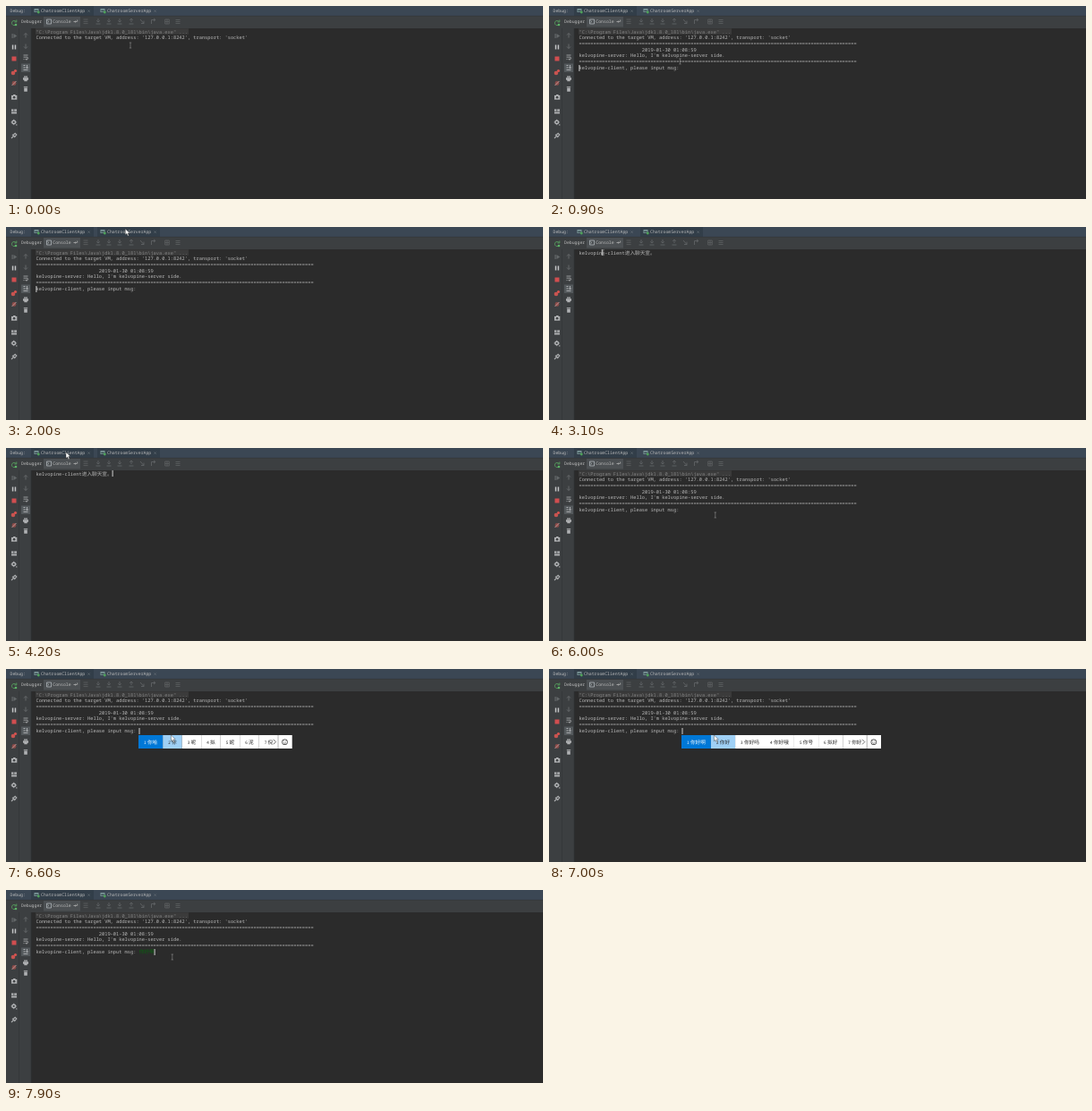
Recreate the animation shown at these times as an HTML page. Size 600 by 216 pixels, loop 8 s.

```html
<!DOCTYPE html>
<html lang="zh-CN">
<head>
<meta charset="utf-8">
<title>Chatroom console</title>
<style>
html, body { margin: 0; width: 100%; height: 100%; overflow: hidden; background: #2b2b2b; }
svg { display: block; width: 600px; height: 216px; }
text { white-space: pre; text-rendering: geometricPrecision; font-family: "Noto Sans Mono", "DejaVu Sans Mono", "Noto Sans CJK SC", "Noto Sans CJK", monospace; }
.ui { font-size: 4.83px; fill: #bcbcbc; }
.out { font-size: 5.34px; fill: #bbbbbb; }
.cjk { font-size: 5.65px; font-family: "Noto Sans CJK SC", "Noto Sans CJK", "Noto Sans", sans-serif; }
.digit { font-size: 4.6px; }
.line { fill: none; stroke-width: 1; }
</style>
</head>
<body>
<svg id="stage" viewBox="0 0 600 216" xmlns="http://www.w3.org/2000/svg">
  <rect width="600" height="216" fill="#2b2b2b"/>
  <rect width="600" height="25" fill="#3c3f41"/>
  <rect width="28" height="216" fill="#3c3f41"/>
  <rect width="600" height="11" fill="#3b4754"/>
  <rect id="selected" width="70" height="11" fill="#323e49"/>
  <rect id="hovered" width="70" height="11" fill="#323e49"/>
  <path d="M14.5 25V216M28 25V216M0 11.2H600" class="line" stroke="#323537" style="stroke-width:.6"/>
  <text class="ui" x="4.5" y="7.2">Debug:</text>
  <g id="tabs"></g>
  <rect x="42" y="12" width="41" height="11.5" fill="#4c5053"/>
  <text class="ui" x="17" y="19.3">Debugger</text>
  <text class="ui" x="52.3" y="19.3">Console</text>
  <path d="M45.5 15h5v5h-5zM46.5 16.3l1.3 1.2-1.3 1.2" class="line" stroke="#aeb4b8" style="stroke-width:.8"/>
  <path d="M75.5 17.5h3m-1-1l1 1-1 1M79.7 15.5v2.2" class="line" stroke="#b4b4b4" style="stroke-width:.8"/>
  <g id="toolbar"></g>
  <g id="rail"></g>
  <g id="client">
    <rect x="33" y="25.3" width="171" height="6.4" fill="#3b3b3b"/>
    <g id="intro"></g>
    <g id="greeting"></g>
    <text id="input" class="cjk" x="148.7" y="70.8" fill="#08650e">你好啊</text>
  </g>
  <g id="server"></g>
  <rect id="caret" width="1" height="7" fill="#d0d0d0"/>
  <g id="popup"></g>
  <path id="ibeam" d="M-1.2-3H1.2M0-3V3M-1.2 3H1.2" class="line" stroke="#8e8e8e" style="stroke-width:.6"/>
  <path id="arrow" d="M0 0V6.8L1.6 5.3 2.8 8 4 7.5 2.8 4.9H5z" fill="#fff" stroke="#222" stroke-width=".4"/>
</svg>
<script>
const LOOP = 8000, STEP = 100;
const $ = id => document.getElementById(id);
const show = (id, on) => $(id).setAttribute('visibility', on ? 'inherit' : 'hidden');
const place = (id, x, y) => $(id).setAttribute('transform', `translate(${x} ${y})`);
const label = (cls, x, y, s, fill) =>
  `<text class="${cls}" x="${x}" y="${y}"${fill ? ` style="fill:${fill}"` : ''}>${s}</text>`;
const stroke = (d, color, width = 1) =>
  `<path d="${d}" class="line" stroke="${color}" style="stroke-width:${width}"/>`;
const shape = (d, color) => `<path d="${d}" fill="${color}"/>`;
const dot = (x, y, r, color) => `<circle cx="${x}" cy="${y}" r="${r}" fill="${color}"/>`;

// Static interface
const TABS = { client: 28, server: 102 };
const tab = (x, name) =>
  shape(`M${x} 3h5v4h-5z`, '#7f9a9c') + shape(`M${x + .8} 4.5h3.4v1.8h-3.4z`, '#3d5356') +
  dot(x + 4.8, 7, 1.4, '#4fa35a') + label('ui', x + 7.5, 7.2, name) +
  stroke(`M${x + 60} 4.5l2.2 2.2m0-2.2l-2.2 2.2`, '#717980', .6);
$('tabs').innerHTML =
  tab(TABS.client + 3.5, 'ChatroomClientApp') + tab(TABS.server + 3.5, 'ChatroomServerApp');

const stepIcon = (x, head) => `M${x - 2.5} 20h5M${x} 14v4${head}`;
$('toolbar').innerHTML =
  stroke('M86.5 15h5M86.5 17.3h5M86.5 19.6h5', '#5d6163', .8) +
  stroke([103, 115, 127].map(x => stepIcon(x, 'm-1.8-1.6l1.8 1.6 1.8-1.6')).join('') +
    stepIcon(140, 'm-1.8-2.2l1.8-1.8 1.8 1.8') +
    'M150 15l4 4.5m0-3v3h-3M162.5 20V15.5h4.5m-2-1.5l2 1.5-2 1.5', '#5f6365', .9) +
  stroke('M177.7 15h4.6v5h-4.6zM177.7 17.5h4.6M180 15v5M189.5 15.5h5M189.5 17.5h5M189.5 19.5h5', '#5d6163', .8);

const GREY = '#afb1b3', DIM = '#64686a', RED = '#c75450';
$('rail').innerHTML =
  stroke('M11.2 17.5A2.6 2.6 0 1 0 11.5 20M11.8 15.5v2.4H9.4', '#559b5d') + dot(11, 21, 1.3, '#5db567') +
  shape('M6.5 31h1.2v5H6.5zM8.5 31l3.7 2.5-3.7 2.5z', DIM) +
  shape('M6.8 43.5h1.5v5H6.8zM9.7 43.5h1.5v5H9.7z', '#c2c4c5') +
  shape('M6.5 56.5h5v5h-5z', '#d14e50') +
  dot(8, 75, 2.3, RED) + dot(10.5, 72.5, 1.6, '#d9534f') +
  dot(9, 86.5, 2.4, '#8b4b49') + stroke('M6.5 89l5-5', '#c2a09e', .9) +
  shape('M6 100h1.7l.7-1h1.8l.7 1H12.3v4.8H6z', GREY) + dot(9.1, 102.3, 1.3, '#3c3f41') +
  shape('M6 115.5h2.5v2.2H6zM9.2 115.5h2.8v2.2H9.2zM6 118.5h6v2H6z', GREY) +
  stroke('M8.7 126.8v6.4M5.5 130h6.4', GREY, .8) + dot(8.7, 130, 2.5, GREY) +
  dot(8.7, 130, 1.1, '#3c3f41') + dot(11.8, 133, .7, GREY) +
  stroke('M6 148l2.4-2.4M7 143.8l3.2 3.2M8 144.5l2.2-2 1.6 1.6-2 2.2', GREY, 1.1) +
  stroke('M22 35.5v-5m-2 2l2-2 2 2M22 42.5v5m-2-2l2 2 2-2', DIM) +
  stroke('M19.5 55h5M19.5 57.2h4.5q1.2 1.2 0 2.4h-2m1-1l-1 1 1 1M19.5 59.6h1', GREY, .8) +
  shape('M17 64.5h10v9.5H17z', '#54595c') +
  stroke('M19.5 71.5h5M19.5 66.5h2M19.5 69h2M23.5 66v4m-1.4-1.4l1.4 1.4 1.4-1.4', '#c0c2c4', .8) +
  shape('M20 78.5h4v1.3h-4zM19 80.3h6v2.5h-6zM20.3 82.8h3.4v1.4h-3.4z', GREY) +
  shape('M19.8 90.3h4.4v.9h-4.4zM20.2 91.8h3.6v4h-3.6z', GREY);

// Console contents
const CLIENT = 'kelvopine-client', SERVER = 'kelvopine-server';
const RULE = '='.repeat(97);
const row = n => 30.5 + n * 6.72;
const lines = (list, first) => list.map((s, i) => label('out', 33.5, row(first + i), s)).join('');
$('intro').innerHTML =
  label('out', 33.5, row(0), '"C:\\Program Files\\Java\\jdk1.8.0_181\\bin\\java.exe" ...', '#858585') +
  lines(["Connected to the target VM, address: '127.0.0.1:8242', transport: 'socket'"], 1);
$('greeting').innerHTML = lines([
  RULE, ' '.repeat(22) + '2019-01-30 01:08:59', `${SERVER}: Hello, I'm ${SERVER} side.`,
  RULE, `${CLIENT}, please input msg: `
], 2);
$('server').innerHTML = label('out', 33.5, row(0), CLIENT) + label('cjk', 84.8, row(0), '进入聊天室。', '#bbbbbb');

// Each step holds until the next one: [ms, value]
const caretSteps = [
  [0, null], [700, [33.4, 66]], [2300, null], [2900, [58.8, 25]], [3500, [118.6, 25]],
  [4500, [33.4, 66]], [5000, [148.5, 66]], [6000, null], [6200, [148.5, 66]], [7100, [165.6, 66]]
];
const popupSteps = [
  [0, ''], [6300, '你 那 能 年 呢 内 拿'], [6400, '你 呢 拟 妮 泥 倪 尼'],
  [6500, '你好 你 呢 拟 妮 泥 倪'], [6600, '你哈 你 呢 拟 妮 泥 倪'],
  [6700, '你好 你号 拟好 你 呢 拟 妮'], [6800, '你好啊 你好阿 你好 你好奥 你好哦 你好吖 你号'],
  [7000, '你好啊 你好 你好吗 你好哦 你号 拟好 你好'], [7100, '']
];
const mousePath = [
  [0, 139, 44], [200, 139, 51], [400, 139, 51], [1200, 150, 67], [1400, 164, 80], [1900, 134, 4],
  [2000, 133.3, 2], [2300, 133.3, 2], [2900, 61, 29], [3200, 60.5, 28.5], [3500, 121, 31],
  [3600, 121, 33], [4000, 68.5, 9], [4200, 67, 4.7], [4500, 67, 4.7], [5000, 186, 77], [5200, 185.8, 75]
];

const held = (steps, t) => steps.filter(s => s[0] <= t).pop()[1];
function mouseAt(t) {
  const i = mousePath.findIndex(p => p[0] > t);
  if (i < 0) return mousePath[mousePath.length - 1].slice(1);
  const [t0, x0, y0] = mousePath[i - 1], [t1, x1, y1] = mousePath[i];
  const k = (t - t0) / (t1 - t0), e = k * k * (3 - 2 * k);
  return [x0 + (x1 - x0) * e, y0 + (y1 - y0) * e];
}

function popupMarkup(words, mouseX) {
  if (!words) return '';
  const box = (x, w, fill) => shape(`M${x} 74h${w}v15h-${w}z`, fill);
  let x = 148, body = '';
  words.split(' ').forEach((word, i) => {
    const w = 15.8 + word.length * 5.7;
    const hover = mouseX >= x && mouseX < x + w;
    const ink = i === 0 ? '#fff' : '#222';
    body += box(x, w, i === 0 ? '#0078d7' : hover ? '#9fd0f5' : '#fff') +
      label('cjk digit', x + 6, 84, i + 1, ink) + label('cjk', x + 9.9, 84.2, word, ink);
    x += w;
  });
  return body + box(x, 15.5, '#fff') +
    stroke(`M${x - 5.5} 78.8l2.8 2.8-2.8 2.8`, '#333', .7) + stroke(`M${x - .5} 74v15`, '#b8b8b8', .6) +
    dot(x + 7.3, 81.8, 3.2, '#333') + dot(x + 7.3, 81.8, 2.5, '#fff') +
    dot(x + 6.3, 81, .4, '#333') + dot(x + 8.3, 81, .4, '#333') +
    stroke(`M${x + 5.8} 82.6q1.5 1.5 3 0`, '#333', .6);
}

function render(time) {
  const t = Math.floor((time % LOOP) / STEP) * STEP;
  const onServer = t >= 2300 && t < 4500;
  show('client', !onServer);
  show('server', onServer);
  show('greeting', !onServer && t >= 700);
  show('input', t >= 7100);

  const caret = held(caretSteps, t);
  show('caret', caret);
  if (caret) place('caret', ...caret);

  const words = held(popupSteps, t), [x, y] = mouseAt(t);
  $('popup').innerHTML = popupMarkup(words, x);

  place('selected', onServer ? TABS.server : TABS.client, 0);
  place('hovered', x < 100 ? TABS.client : TABS.server, 0);
  show('hovered', y < 11);

  const pointing = y < 24 || words !== '';
  const hidden = t >= 7100 && t < 7900;
  show('arrow', pointing && !hidden);
  show('ibeam', !pointing && !hidden);
  place('arrow', words ? x - 1.4 : x, words ? y - 1 : y);
  place('ibeam', x, y);
}

const start = performance.now();
function tick() {
  render(performance.now() - start);
  requestAnimationFrame(tick);
}
tick();
</script>
</body>
</html>
```
